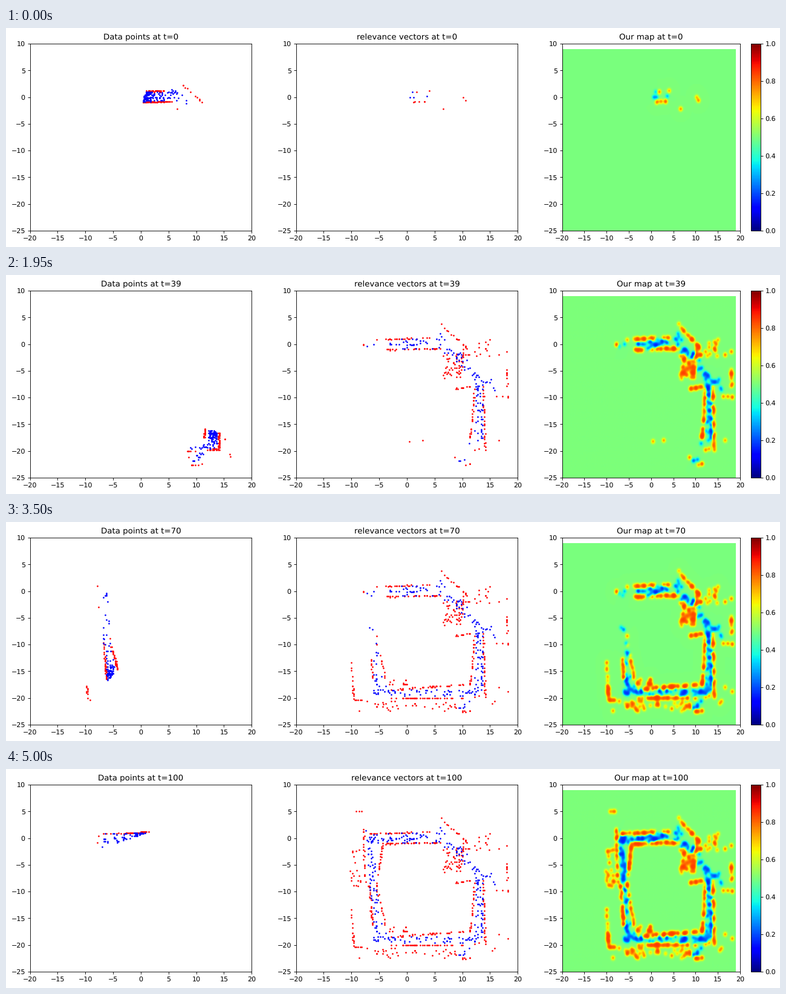
Recreate the animation shown at these times as a matplotlib script. Size 1280 by 363 pixels, loop 5.05 s.

```python
import numpy as np
import matplotlib.pyplot as plt
from matplotlib.animation import FuncAnimation

W, H, DPI = 1280, 363, 80
STEPS, INTERVAL = 101, 50
CELL = 0.2
rng = np.random.default_rng(7)
plt.rcParams["text.hinting"] = "none"

# Floor plan: corners of each wall
WALLS = [np.reshape(w, (-1, 2)).astype(float) for w in (
    (-6.9, .8, 4.2, 1.2),
    (4.6, 4.4, 4.8, 5.8, 6.8, 5.8),
    (6, 3.8, 11.4, -1.2, 13.4, 1.6),
    (14.2, 3, 16.4, .4),
    (18, -1, 18.2, -10, 15.6, -9.6),
    (13.8, -8, 14.2, -19.7, 12, -19.8),
    (12, -22.4, 9, -22.6),
    (10, -20, -3, -20),
    (-3, -18.4, 11.5, -17.4, 12.2, -8),
    (11.4, -8, 8.6, -8.4),
    (6, -.8, -4.4, -1.1, -5.5, -9, -3.8, -16.6),
    (-6.2, -16.4, -6.8, -9, -7.6, -8, -7.8, 1.6),
    (-8, -12.8, -10, -13, -9.6, -20.4, -8, -20.4),
    (-10.6, 5, -7.6, 5, -7.2, 4))]

# Free floor: half width, then the middle line
FLOORS = [
    (.9, -7, 0, 6, .2), (1, 6, .2, 9, -2, 13, -7), (.8, 5.4, .5, 5.6, 4.6),
    (.8, 13, -6, 17, -8.6), (.75, 13, -7, 13, -19), (.65, 13, -19, -6, -19.1),
    (.5, 11.2, -20, 9.6, -22.2), (.9, -3.4, -18.4, -6, -18),
    (.7, -5.2, -17, -6.2, -9, -6.6, 0), (.2, -7.3, 1, -7.6, 4)]

# Loose obstacles: centre, half extents, count
CLUTTER = [
    (8.4, -4, 1.8, 2.4, 50), (15, -.6, 2, 1.6, 24), (16.6, -19, 2, 2.4, 14),
    (3, -21.8, 6, 1, 24), (-5.5, -21.6, 3.5, 1.1, 26), (-9.4, -5, 1.1, 4, 30),
    (-2, -17, 2, .6, 14), (14, -1.8, 4, .8, 12)]

# Robot: time, x, y, heading in degrees
POSES = np.array([
    (0, .6, 0, -20), (3, .6, 0, -20), (5, .2, 0, 180), (7, .2, 0, 180), (10, 1, 0, 0),
    (14, 3.8, -.4, -10), (22, 9, -2, -50), (30, 13, -8.4, -90), (42, 13, -18.8, -110),
    (47, 12.2, -18.7, -200), (60, .4, -19, -180), (68, -5.4, -18, -210),
    (79, -6.4, -8.4, -270), (90, -6.6, -.2, -320), (95, -3, .2, -360), (100, .4, .8, -250)])


def along(v, step):
    """Points every step along a polyline."""
    legs = [a + (b - a) * np.arange(0, 1, step / np.hypot(*(b - a)))[:, None]
            for a, b in zip(v, v[1:])]
    return np.vstack(legs)


def spread(p, *half):
    return p + rng.uniform(-1, 1, p.shape) * half


wall = spread(np.vstack([along(w, .1) for w in WALLS]), .1)
loose = np.vstack([spread(np.tile((x, y), (n, 1)), rx, ry) for x, y, rx, ry, n in CLUTTER])
floor = np.vstack([spread(along(np.reshape(xy, (-1, 2)).astype(float), 1 / (80 * w)), w)
                   for w, *xy in FLOORS])

points = np.vstack([wall, loose, floor])
sizes = len(wall), len(loose), len(floor)
is_red = np.repeat([True, True, False], sizes)
is_loose = np.repeat([False, True, False], sizes)
relevant = rng.random(len(points)) < np.repeat([.3, 1, .09], sizes)
weight = np.where(is_red, 1, -.8) * rng.uniform(.7, 1.4, len(points))
snapped = np.round(points / CELL) * CELL

start = np.vstack([w[:-1] for w in WALLS])
side = np.vstack([np.diff(w, axis=0) for w in WALLS])


def cross(a, b):
    return a[..., 0] * b[..., 1] - a[..., 1] * b[..., 0]


def hidden(eye, p):
    """True where a wall cuts the line of sight from eye to p."""
    ray = p - eye
    ray = ray * np.maximum(0, 1 - .3 / np.hypot(*ray.T))[:, None]
    ray = ray[:, None]
    turn = cross(ray, side) + 1e-9
    on_ray = cross(start - eye, side) / turn
    on_wall = cross(start - eye, ray) / turn
    return ((on_ray > 0) & (on_ray < 1) & (on_wall > 0) & (on_wall < 1)).any(axis=1)


def scan(t):
    """Indices of the points met by the half-circle laser at step t."""
    x, y, head = (np.interp(t, POSES[:, 0], col) for col in POSES[:, 1:].T)
    eye = np.array([x, y])
    rel = points - eye
    d = np.hypot(*rel.T) + 1e-6
    ahead = rel @ (np.cos(np.radians(head)), np.sin(np.radians(head))) > 0
    chance = np.where(is_red, (3 / d) ** 2, (.8 / d) ** 1.4)
    reach = np.where(is_loose, 7, 19)
    hit = np.flatnonzero(ahead & (d < reach) & (rng.random(len(d)) < chance))
    return hit[is_loose[hit] | ~hidden(eye, points[hit])]


scans = [scan(t) for t in range(STEPS)]
born = np.full(len(points), STEPS)
for t, hit in enumerate(scans):
    new = hit[relevant[hit] & (rng.random(len(hit)) < .35)]
    born[new] = np.minimum(born[new], t)

gx = np.arange(-20, 18.9, CELL) + CELL / 2
gy = np.arange(-25, 8.9, CELL) + CELL / 2


def occupancy(t):
    known = born <= t
    p = snapped[known]
    kx = np.exp(-6 * (gx - p[:, :1]) ** 2)
    ky = np.exp(-6 * (gy - p[:, 1:]) ** 2)
    total = (weight[known, None] * ky).T @ kx
    return 1 / (1 + np.exp(-1.7 * np.tanh(.65 * total)))


fig = plt.figure(figsize=(W / DPI, H / DPI), dpi=DPI, facecolor="white")
axes = [fig.add_axes([x / W, 27 / H, w / W, 310 / H])
        for x, w in ((39.6, 366.7), (479.6, 366.7), (919.6, 368))]
image = axes[2].imshow(occupancy(0), extent=(-20, 18.9, -25, 8.9), origin="lower",
                       cmap="jet", vmin=0, vmax=1, aspect="auto", interpolation="bilinear")
fig.colorbar(image, ax=axes[2])
for ax in axes:
    ax.set(xlim=(-20, 20), ylim=(-25, 10),
           xticks=range(-20, 21, 5), yticks=range(-25, 11, 5))
names = ("Data points", "relevance vectors", "Our map")
titles = [ax.set_title("") for ax in axes]
dots = [[ax.scatter([], [], s=2, c=c) for c in ("red", "blue")] for ax in axes[:2]]


def draw(t):
    for title, name in zip(titles, names):
        title.set_text(f"{name} at t={t}")
    for (red, blue), shown in zip(dots, (scans[t], np.flatnonzero(born <= t))):
        red.set_offsets(snapped[shown[is_red[shown]]])
        blue.set_offsets(snapped[shown[~is_red[shown]]])
    image.set_data(occupancy(t))
    return []


anim = FuncAnimation(fig, draw, frames=STEPS, interval=INTERVAL, repeat=True, repeat_delay=0)
plt.show()
```
